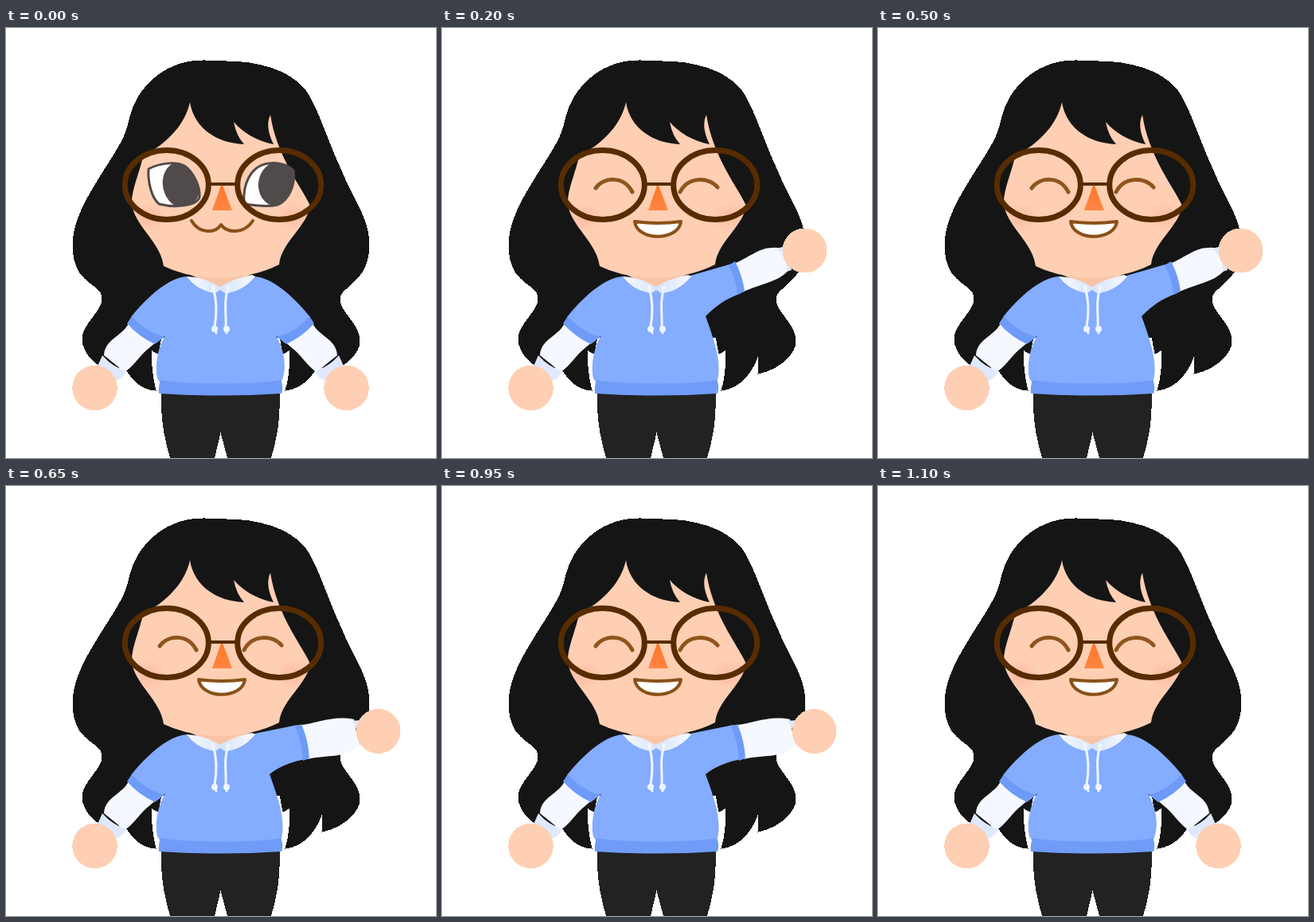
These frames come from a looping animation (540x540 px, 1400 ms). An HTML page:

```html
<!DOCTYPE html>
<html lang="en">
<head>
<meta charset="utf-8">
<title>Waving girl</title>
<style>
  html, body { margin: 0; width: 100%; height: 100%; overflow: hidden; background: #fff; }
  svg { display: block; width: 100%; height: 100%; }
  .crisp { shape-rendering: crispEdges; }
  .skin { fill: #ffcfb3; }
</style>
</head>
<body>
<svg viewBox="0 0 540 540" fill="none">
  <defs>
    <radialGradient id="blush">
      <stop offset="0" stop-color="#f9a994" stop-opacity=".5"/>
      <stop offset="1" stop-color="#f9a994" stop-opacity="0"/>
    </radialGradient>
    <linearGradient id="collar">
      <stop offset="0" stop-color="#f7faff"/>
      <stop offset=".48" stop-color="#d9e5fa"/>
      <stop offset=".54" stop-color="#d9e5fa"/>
      <stop offset="1" stop-color="#f7faff"/>
    </linearGradient>
    <linearGradient id="nose" x2="0" y2="1">
      <stop offset="0" stop-color="#ff7424"/>
      <stop offset="1" stop-color="#ff8643"/>
    </linearGradient>
    <path id="face" d="M231 93C227 112 213 139 172 161C168 182 157 203 158 222C163 250 194 269 198 299Q226 313 268 314Q312 313 343 297C345 270 379 248 382 223C372 201 340 162 332 109C326 122 331 135 336 146C315 142 297 131 286 118Q289 135 299 146C261 145 235 122 231 93Z"/>
    <clipPath id="faceClip"><use href="#face"/></clipPath>
    <clipPath id="eyeL"><path id="lidL" d="M179 177C192 170 212 167 224 173C236 181 244 200 243 212C240 224 212 226 192 221C182 212 178 192 179 177Z"/></clipPath>
    <clipPath id="eyeR"><path id="lidR" d="M299 221C297 198 306 173 330 170C341 168 355 172 361 179C364 198 354 217 341 222C329 225 312 223 299 221Z"/></clipPath>

    <g id="armDown">
      <path fill="#f5f8ff" d="M154 371C146 387 124 391 123 411L149 432C160 425 166 414 176 405Q186 396 197 388Z"/>
      <path fill="#dfe8fd" d="M121 411L114 427L138 443Q147 440 151 431Q133 425 121 411Z"/>
      <circle cx="111.5" cy="452" r="28.3" class="skin crisp"/>
      <path fill="#84acff" d="M228 312C205 313 179 336 157 363Q174 382 193 391L202 385L250 390V330Z"/>
      <path fill="#6e9bf7" d="M158 362L152 371Q167 388 187 397L199 388Q174 381 158 362Z"/>
    </g>
  </defs>

  <path class="crisp" fill="#151515" stroke="#151515" d="M250 41C207 40 165 67 154 119C148 156 84 218 84 272C84 325 121 318 121 340C121 356 96 372 96 391C97 408 112 427 142 434L141 408C149 430 164 454 188 455C184 440 182 424 182 404L191 409L195 388L270 400L344 388L348 409L357 404C357 424 356 440 351 455C376 452 391 430 398 408L397 434C428 427 444 407 444 393C444 372 419 357 419 340C419 324 456 320 456 272C456 238 432 209 421 179C402 139 393 104 378 81C355 50 310 42 277 42Q264 41 250 41Z"/>

  <path class="crisp" fill="#222" d="M195 455C194 490 198 512 206 540H262L269.5 508L278 540H333C342 510 344 490 344 455Z"/>

  <path fill="#f9c3a6" d="M224 306H315L268 328Z"/>
  <use href="#face" class="skin"/>
  <g clip-path="url(#faceClip)" fill="url(#blush)">
    <ellipse cx="179" cy="238" rx="24" ry="19"/>
    <ellipse cx="361" cy="237" rx="24" ry="19"/>
  </g>

  <g id="open" stroke-linejoin="round">
    <use href="#lidL" fill="#fff"/>
    <g clip-path="url(#eyeL)"><ellipse cx="220" cy="197" rx="23" ry="29" fill="#514a4a" transform="rotate(-12 220 197)"/></g>
    <use href="#lidL" stroke="#514a4a" stroke-width="3"/>
    <use href="#lidR" fill="#fff"/>
    <g clip-path="url(#eyeR)"><ellipse cx="341" cy="196" rx="24" ry="28" fill="#514a4a" transform="rotate(8 341 196)"/></g>
    <use href="#lidR" stroke="#514a4a" stroke-width="3"/>
    <path stroke="#8a5018" stroke-width="4" stroke-linecap="round" d="M233 242C243 259 263 258 270 247C278 258 299 259 310 242"/>
  </g>
  <g id="happy" stroke="#8f551d" stroke-linecap="round" stroke-linejoin="round">
    <path stroke-width="5" d="M193 201C203 187 228 185 239 206M299 206C309 186 335 187 346 200"/>
    <path stroke="#8a5018" stroke-width="4" fill="#fff" d="M242 243Q271 247 300 243C297 268 245 268 242 243Z"/>
  </g>

  <path fill="url(#nose)" d="M271 195L284 229H259Z"/>
  <g stroke="#572c00">
    <ellipse cx="201.8" cy="197" rx="52.5" ry="43.5" stroke-width="7"/>
    <ellipse cx="343.2" cy="197" rx="52.5" ry="43.5" stroke-width="7"/>
    <path d="M256 196H289" stroke-width="4"/>
  </g>

  <use href="#armDown"/>
  <use id="rest" href="#armDown" transform="matrix(-1 0 0 1 539 0)"/>
  <g id="high">
    <path fill="#f5f8ff" d="M362 298C385 289 398 276 414 276Q426 275 430 280L436 303C424 319 402 320 377 332Z"/>
    <path fill="#dfe8fd" d="M420 277L431 274Q438 288 439 304L433 306Q434 288 420 277Z"/>
    <circle cx="455.5" cy="279.5" r="28" class="skin crisp"/>
    <path fill="#84acff" d="M290 325L312 311L364 296L376 333C356 340 344 349 331 362L280 380Z"/>
    <path fill="#6e9bf7" d="M360 298L368 293Q377 310 380 330L371 335Q370 316 360 298Z"/>
  </g>
  <g id="low">
    <path fill="#f5f8ff" d="M365 301C394 298 408 288 437 293L443 324C430 343 402 337 379 343Z"/>
    <path fill="#dfe8fd" d="M434 295L446 294Q450 309 450 323L443 326Q445 309 434 295Z"/>
    <circle cx="467.5" cy="308" r="28" class="skin crisp"/>
    <path fill="#84acff" d="M290 325L312 311L366 300L377 343C359 346 343 352 331 362L280 380Z"/>
    <path fill="#6e9bf7" d="M363 302L371 299Q380 320 381 342L373 345Q372 321 363 302Z"/>
  </g>

  <path id="torso" fill="#84acff"/>
  <path fill="#709cf8" d="M194 442C220 448 320 448 345 442Q349 450 346 459Q270 464 192 459Q191 450 194 442Z"/>
  <path fill="url(#collar)" d="M227 312Q250 313 268 325Q288 314 309 310L313 312Q296 332 275 333L269 329L263 333Q240 330 227 312Z"/>
  <g stroke="#eff5ff" stroke-width="3" stroke-linecap="round">
    <path d="M260 326C265 342 265 358 262 375M279 326C273 344 277 359 276 375"/>
    <path d="M262 378L264 383M277 378L277 383"/>
  </g>
  <g fill="#eff5ff">
    <circle cx="262" cy="378" r="4"/>
    <circle cx="277" cy="378" r="4"/>
    <circle cx="260" cy="326" r="2.8"/>
    <circle cx="279" cy="326" r="2.8"/>
  </g>
</svg>
<script>
  const LOOP = 1400, WAVE_START = 200, WAVE_END = 1100, BEAT = 150;
  const el = id => document.getElementById(id);
  const show = (id, on) => el(id).setAttribute('display', on ? 'inline' : 'none');

  const torsoLeft = 'M312 311L268 327L228 312L199 388C189 405 187 428 190 440L194 446Q270 454 345 446';
  const torsoRest = torsoLeft + 'C353 431 351 408 340 388Z';
  const torsoWave = torsoLeft + 'C352 423 344 398 331 362Z';

  let last = '';
  function render(time) {
    const t = time % LOOP;
    const waving = t >= WAVE_START && t < WAVE_END;
    const up = Math.floor((t - WAVE_START) / BEAT) % 2 === 0;
    const arm = waving ? (up ? 'high' : 'low') : 'rest';
    const smiling = t >= WAVE_START;
    if (last === arm + smiling) return;
    last = arm + smiling;
    for (const id of ['rest', 'high', 'low']) show(id, id === arm);
    show('open', !smiling);
    show('happy', smiling);
    el('torso').setAttribute('d', waving ? torsoWave : torsoRest);
  }

  const start = performance.now();
  function tick() {
    render(performance.now() - start);
    requestAnimationFrame(tick);
  }
  tick();
</script>
</body>
</html>
```
